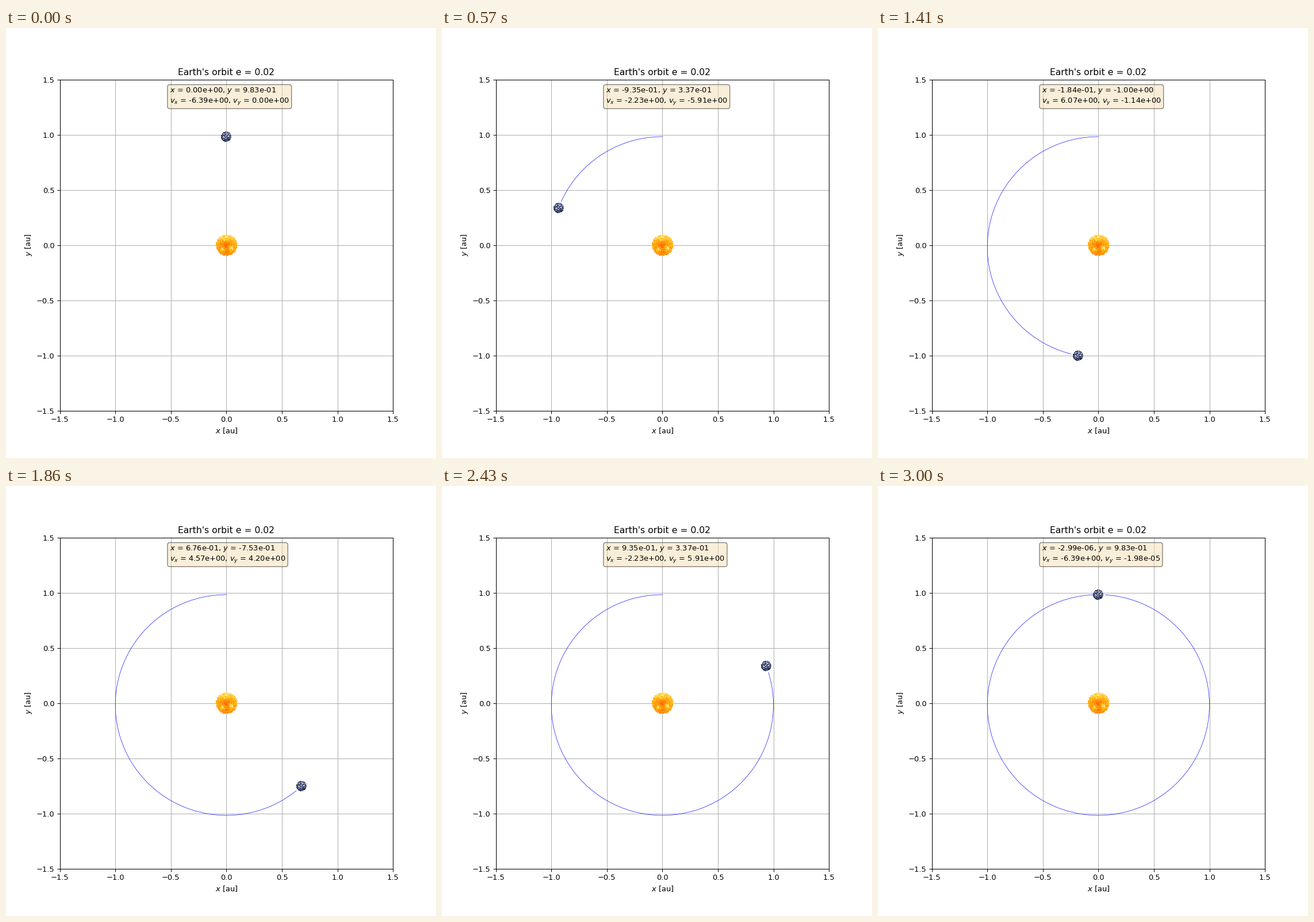
These frames come from a looping animation (748x748 px, 3.03 s). A matplotlib script:

```python
import numpy as np
import matplotlib.pyplot as plt
from matplotlib.animation import FuncAnimation
from matplotlib.colors import to_rgb
from matplotlib.offsetbox import AnnotationBbox, OffsetImage

STEPS = 100        # steps per year
ECC = 0.0167
DRIFT = 4.68e-7    # small integration error per year
SLIP = 7e-7

rng = np.random.default_rng(4)


def orbit(t):
    """Position [au] and velocity [au/yr] at time t, starting at perihelion."""
    mean = 2 * np.pi * t * (1 + DRIFT)
    anom = mean + ECC * np.sin(mean)
    for _ in range(6):
        anom -= (anom - ECC * np.sin(anom) - mean) / (1 - ECC * np.cos(anom))
    b = np.sqrt(1 - ECC**2)
    rate = 2 * np.pi / (1 - ECC * np.cos(anom))
    x, y = -b * np.sin(anom), np.cos(anom) - ECC
    vx, vy = -b * np.cos(anom) * rate, -np.sin(anom) * rate - SLIP * t
    return x + 0.0, y, vx, vy + 0.0


def grid(n):
    u = np.linspace(-1, 1, n)
    return np.meshgrid(u, -u)


def blob(u, v, cx, cy, s):
    return np.exp(-((u - cx)**2 + (v - cy)**2) / s**2)


def disc(u, v, tone, noise, stops, colors):
    """RGBA disc shaded by tone, with a slightly ragged rim."""
    rgb = np.array([to_rgb(c) for c in colors])
    img = np.empty(u.shape + (4,))
    for k in range(3):
        img[..., k] = np.interp(tone, stops, rgb[:, k])
    img[..., 3] = np.hypot(u, v) + 0.07 * noise < 1.02
    return img


def sun_image():
    u, v = grid(76)
    noise = np.kron(rng.random((38, 38)), np.ones((2, 2)))
    tone = 0.42 + 0.3 * (u**2 + v**2) + 0.28 * v + 0.55 * (noise - 0.5)
    tone += 0.55 * blob(u, v, -0.35, -0.38, 0.22)
    tone += 0.55 * blob(u, v, 0.42, -0.3, 0.25)
    tone += 0.2 * blob(u, v, -0.1, 0.55, 0.3)
    tone -= 0.25 * blob(u, v, -0.1, 0.0, 0.35)
    return disc(u, v, tone, noise, [0, 0.3, 0.6, 0.85, 1.1],
                ["#f05a00", "#ff8206", "#ffaa14", "#ffcc20", "#fff0a8"])


def earth_image():
    u, v = grid(180)
    noise = rng.random(u.shape)
    tone = 0.4 + 0.95 * (noise - 0.5) + 0.08 * v
    tone += 0.3 * blob(u, v, 0.2, 0.3, 0.5)
    tone += 0.2 * blob(u, v, -0.4, 0.0, 0.4)
    return disc(u, v, tone, noise, [0, 0.35, 0.6, 0.9],
                ["#0a0d20", "#242f70", "#707a90", "#e4e8e8"])


def sprite(ax, img, zoom, pos=(0, 0)):
    pic = OffsetImage(img, zoom=zoom, dpi_cor=False, interpolation="nearest")
    return ax.add_artist(AnnotationBbox(pic, pos, frameon=False))


fig, ax = plt.subplots(figsize=(8, 8), dpi=93.5)
ax.set(xlim=(-1.5, 1.5), ylim=(-1.5, 1.5), xlabel="$x$ [au]",
       ylabel="$y$ [au]", title="Earth's orbit e = 0.02")
ax.grid(True)

trail, = ax.plot([], [], color="blue", lw=0.5)
sun = sprite(ax, sun_image(), 0.5, pos=(0.003, 0))
earth = sprite(ax, earth_image(), 0.1)
info = ax.text(0.33, 0.98, "", transform=ax.transAxes, va="top",
               bbox=dict(boxstyle="round", facecolor="wheat", alpha=0.5))

path = np.array([orbit(i / STEPS) for i in range(STEPS + 1)])


def update(i):
    x, y, vx, vy = path[i]
    trail.set_data(path[:i, 0], path[:i, 1])
    earth.xy = earth.xybox = (x, y)
    info.set_text(f"$x$ = {x:.2e}, $y$ = {y:.2e}\n"
                  f"$v_x$ = {vx:.2e}, $v_y$ = {vy:.2e}")
    return trail, earth, info


anim = FuncAnimation(fig, update, frames=STEPS + 1, interval=30,
                     init_func=lambda: update(0), repeat=True, repeat_delay=0)
plt.show()
```
